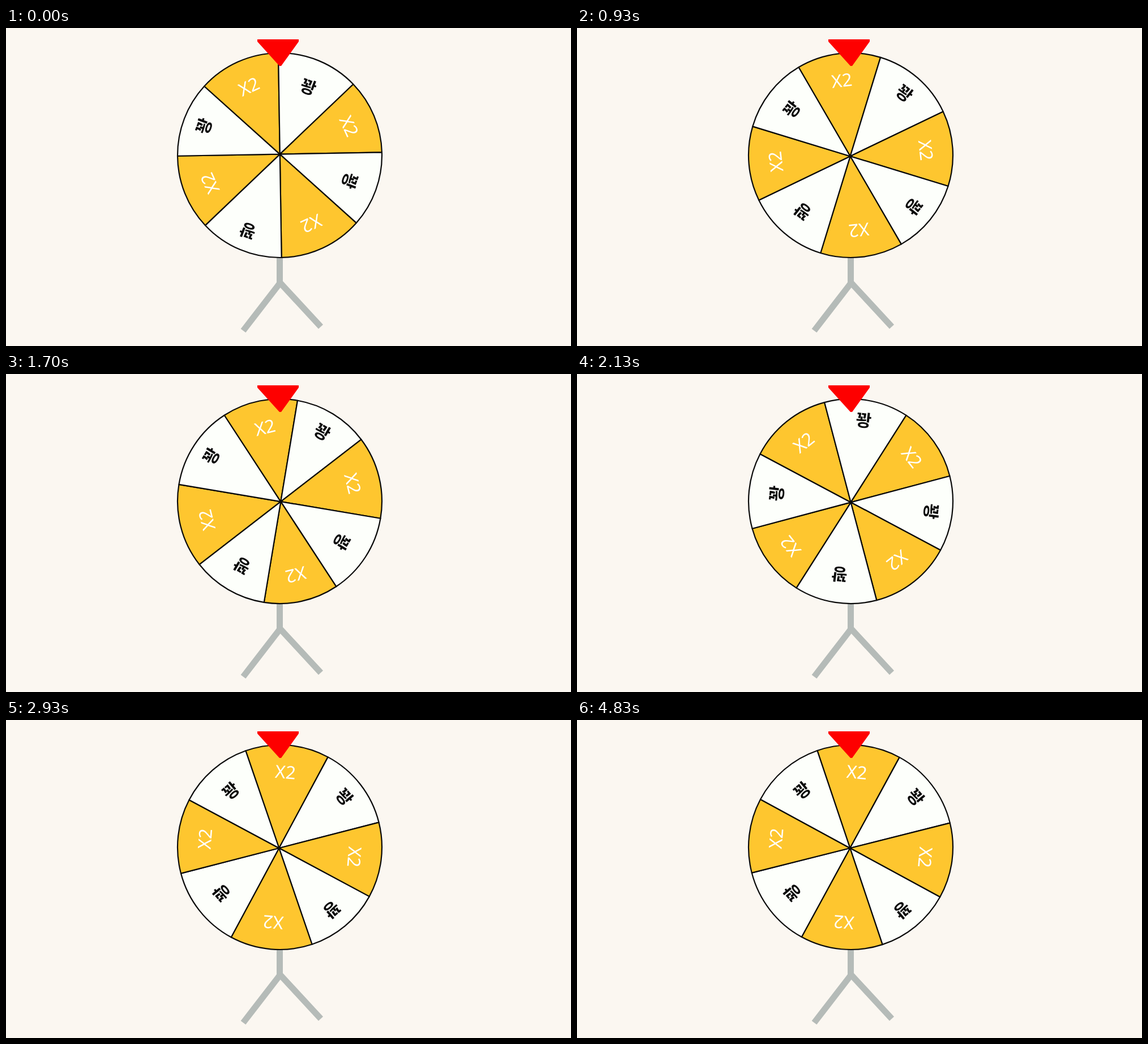
These frames come from a looping animation (998 by 561 pixels, 4.86 s). An HTML page:

```html
<!DOCTYPE html>
<html lang="ko">
<head>
<meta charset="utf-8">
<title>Prize wheel</title>
<style>
  html, body { margin: 0; width: 100%; height: 100%; overflow: hidden; background: #fbf7f1; }
  svg { display: block; width: 100vw; height: 100vh; }
  text { text-anchor: middle; }
  .win { font: 400 31.5px "Noto Sans", sans-serif; fill: #fff; }
  .lose { font: 700 30px "Noto Sans CJK KR", "Noto Sans CJK", "Noto Sans CJK JP", sans-serif; fill: #0a0a0a; }
</style>
</head>
<body>
<svg viewBox="0 0 998 561">
  <path d="M483.5 400V451M487 446L419 534M481 446L556 527" fill="none" stroke="#b5bbb8" stroke-width="11"/>
  <g id="wheel" stroke="#0a0a0a" stroke-width="2.2" stroke-linejoin="round"></g>
  <path d="M444 20H517V24L486 67H483L444 24Z" fill="#fe0000"/>
</svg>
<script>
const LOOP = 4860, FPS = 30;
const CX = 483.5, CY = 224.5, R = 180.5;
const HUB_X = -1.2, HUB_Y = 1.5;
const TURN = 1649.5, SPIN = 3.019;
const RAD = Math.PI / 180;
const wheel = document.getElementById('wheel');

function add(tag, attrs, text) {
  const el = document.createElementNS('http://www.w3.org/2000/svg', tag);
  for (const k in attrs) el.setAttribute(k, attrs[k]);
  if (text) el.textContent = text;
  wheel.appendChild(el);
}

// Angles run clockwise from the top.
const polar = (r, deg) => [r * Math.sin(deg * RAD), -r * Math.cos(deg * RAD)];

// Rim angle hit by a ray that leaves the off-centre hub.
function rimAngle(deg) {
  const [dx, dy] = polar(1, deg);
  const side = -HUB_X * dy + HUB_Y * dx;
  return deg + Math.asin(side / R) / RAD;
}

function addLabel(i, mid) {
  const win = i % 2 === 0;
  const [x, y] = polar(win ? 133 : 138 + 9 * Math.sin(mid * RAD), mid);
  add('text', {
    class: win ? 'win' : 'lose',
    stroke: 'none',
    y: 11.5,
    transform: `translate(${x} ${y}) rotate(${5 + 45 * i})`
  }, win ? 'X2' : '꽝');
}

// Four straight cuts through the hub make eight sectors.
function build() {
  const cuts = [-18.6, 28.6, 75.9, 118.5];
  const rays = [...cuts, ...cuts.map(a => a + 180), cuts[0] + 360].map(rimAngle);
  for (let i = 0; i < 8; i++) {
    add('path', {
      d: `M${HUB_X} ${HUB_Y}L${polar(R, rays[i])}A${R} ${R} 0 0 1 ${polar(R, rays[i + 1])}Z`,
      fill: i % 2 ? '#fdfffb' : '#fec62f'
    });
  }
  for (let i = 0; i < 8; i++) addLabel(i, (rays[i] + rays[i + 1]) / 2);
}

const bezier = (p1, p2, s) => 3 * s * (1 - s) ** 2 * p1 + 3 * s * s * (1 - s) * p2 + s ** 3;

// Fast start with a long slowdown, as cubic-bezier(.1333, .36, .0765, 1).
function ease(x) {
  let lo = 0, hi = 1;
  for (let i = 0; i < 30; i++) {
    const mid = (lo + hi) / 2;
    if (bezier(0.1333, 0.0765, mid) < x) lo = mid;
    else hi = mid;
  }
  return bezier(0.36, 1, lo);
}

function draw(ms) {
  const t = Math.floor((ms % LOOP + 5) * FPS / 1000) / FPS;
  const angle = TURN * (ease(Math.min(t / SPIN, 1)) - 1);
  wheel.setAttribute('transform', `translate(${CX} ${CY}) rotate(${angle})`);
}

build();
let start;
function tick(now) {
  start ??= now;
  draw(now - start);
  requestAnimationFrame(tick);
}
draw(0);
requestAnimationFrame(tick);
</script>
</body>
</html>
```
